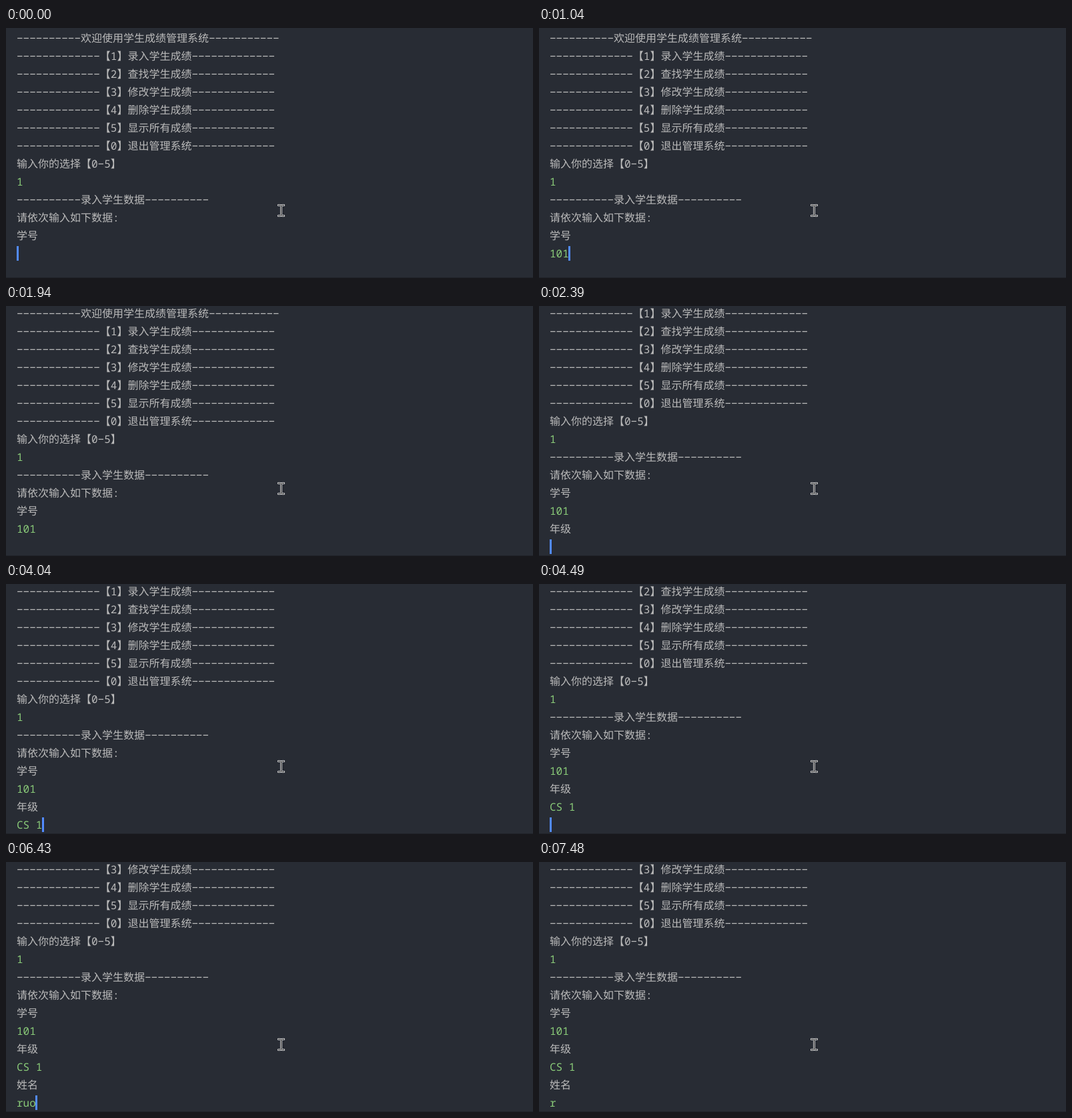
Write an HTML page with a canvas that moves like this. It is 790 by 376 pixels and loops after 8000 ms.

```html
<!DOCTYPE html>
<html lang="zh-CN">
<head>
<meta charset="utf-8">
<title>学生成绩管理系统</title>
<style>
  html, body { margin: 0; width: 100%; height: 100%; overflow: hidden; background: #282c34; }
  canvas { display: block; }
</style>
</head>
<body>
<canvas id="stage" width="790" height="376"></canvas>
<script>
const ctx = document.getElementById('stage').getContext('2d', { alpha: false });
const LOOP = 8000, LEFT = 16, ROW = 27, CELL = 9.6, WIDE = 16;
const COLORS = { back: '#282c34', text: '#bbbbbb', input: '#89ca78', caret: '#528bff', edge: '#202329' };

const dashes = n => '−'.repeat(n);
const menu = (key, label) => dashes(13) + `【${key}】${label}` + dashes(13);
const out = text => ({ text, color: COLORS.text });
const typed = text => ({ text, color: COLORS.input });

const log = [
  out(dashes(10) + '欢迎使用学生成绩管理系统' + dashes(11)),
  out(menu(1, '录入学生成绩')),
  out(menu(2, '查找学生成绩')),
  out(menu(3, '修改学生成绩')),
  out(menu(4, '删除学生成绩')),
  out(menu(5, '显示所有成绩')),
  out(menu(0, '退出管理系统')),
  out('输入你的选择【0−5】'),
  typed('1'),
  out(dashes(10) + '录入学生数据' + dashes(10)),
  out('请依次输入如下数据:'),
  out('学号'),
  typed('101'),
  out('年级'),
  typed('CS 1'),
  out('姓名')
];

// [start ms, finished rows, current input, caret shown]
const steps = [
  [0, 12, '', true], [440, 12, '', false],
  [740, 12, '1', true], [890, 12, '10', true], [1040, 12, '101', true],
  [1340, 13, '', true], [1940, 13, '', false],
  [2390, 14, '', true], [2990, 14, 'C', true], [3140, 14, 'CS', true],
  [3740, 14, 'CS ', true], [4040, 14, 'CS 1', true],
  [4490, 15, '', true], [4640, 16, '', true], [5540, 16, '', false],
  [5990, 16, 'r', true], [6290, 16, 'ru', true], [6430, 16, 'ruo', true],
  [6730, 16, 'ru', true], [6880, 16, 'r', true], [7480, 16, 'r', false]
];

// Terminal grid: CJK characters take a wide cell.
function drawRow({ text, color }, middle) {
  ctx.fillStyle = color;
  let x = LEFT;
  for (const char of text) {
    ctx.fillText(char, x, middle + 6);
    x += char >= '\u3000' ? WIDE : CELL;
  }
}

function drawPointer() {
  const beam = new Path2D('M408.5 266.5h2q2 0 2 2q0-2 2-2h2 M412.5 268v13 M408.5 282.5h2q2 0 2-2q0 2 2 2h2');
  ctx.lineCap = 'square';
  for (const [width, color] of [[2.6, '#ffffff'], [1, '#111111']]) {
    ctx.lineWidth = width;
    ctx.strokeStyle = color;
    ctx.stroke(beam);
  }
}

function draw(time) {
  const [, rows, input, caret] = steps.findLast(step => step[0] <= time);
  const scroll = Math.max(0, (rows - 13) * ROW + 4);
  const middle = row => 15 + row * ROW - scroll;

  ctx.fillStyle = COLORS.back;
  ctx.fillRect(0, 0, 790, 376);
  ctx.font = '16px "Noto Sans Mono", "Noto Sans CJK SC", "Noto Sans CJK", monospace';
  ctx.textRendering = 'geometricPrecision';
  log.slice(0, rows).forEach((line, row) => drawRow(line, middle(row)));
  drawRow(typed(input), middle(rows));

  if (caret) {
    ctx.fillStyle = COLORS.caret;
    ctx.fillRect(Math.floor(LEFT + input.length * CELL), middle(rows) - 11, 3, 22);
  }
  ctx.fillStyle = COLORS.edge;
  ctx.fillRect(0, 375, 790, 1);
  drawPointer();
}

const start = performance.now();
function tick() {
  draw((performance.now() - start) % LOOP);
  requestAnimationFrame(tick);
}
tick();
</script>
</body>
</html>
```
